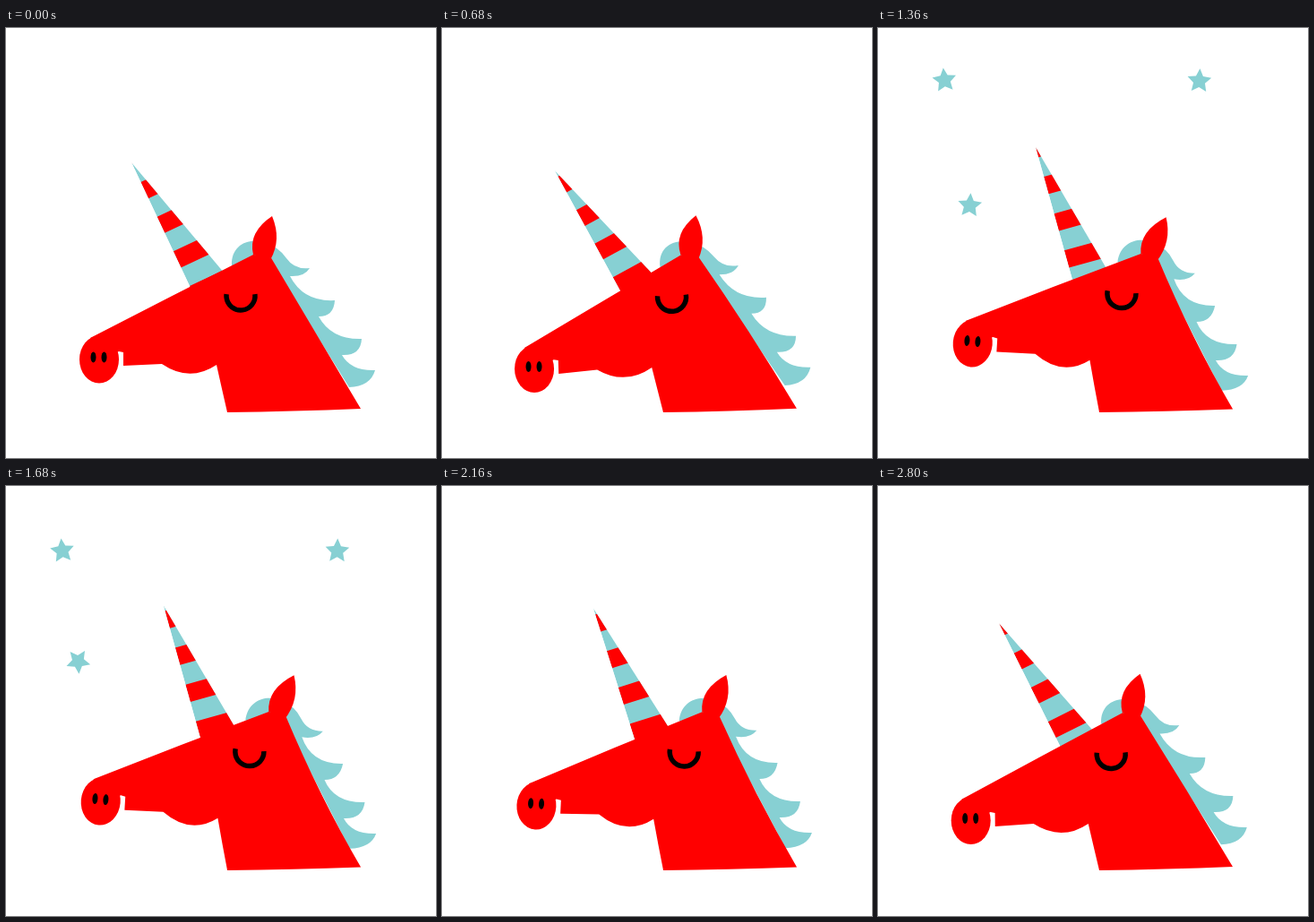
These frames come from a looping animation (480x480 px, 2840 ms). An HTML page with a canvas:

```html
<!DOCTYPE html>
<html lang="en">
<head>
<meta charset="utf-8">
<title>Unicorn</title>
<style>
  html, body { margin: 0; width: 100%; height: 100%; overflow: hidden; background: #fff; }
  canvas { display: block; width: 100vw; height: 100vh; }
</style>
</head>
<body>
<canvas id="stage" width="480" height="480"></canvas>
<script>
const ctx = document.getElementById('stage').getContext('2d');
const RED = '#f00', AQUA = '#87d0d3';
const LOOP = 2840, STEP = 40;

// Keyframes as [time, value], eased between neighbours
const NOD = [[0, 0], [560, -.55], [690, -.55], [1010, 1], [1600, 1], [2095, .92], [2510, -.5], [3000, 0]];
const SNOUT = [[0, 0], [700, 0], [850, 6], [1020, -7], [1060, -7], [1300, 1], [1680, 1],
  [2160, 2.7], [2330, -4], [2480, 0], [3000, 0]];

const MANE = 'M252 265 C251 240 275 233 290 241 Q303 243 313 257 Q322 270 339 268 Q333 278 317 277 ' +
  'Q332 306 367 304 Q366 322 349 322 Q363 348 397 347 Q396 366 375 365 Q385 383 412 382 ' +
  'Q407 400 383 401 L300 268 Z';
const HEAD = 'M94 346 Q185 299 276 253 L295 255 Q346 341 396 425 Q320 428 247 429 Q241 403 235 376 ' +
  'Q205 396 174 375 L131 377 L131 362 L126 361 L104 370 Z';
const EAR = 'M297 210 Q270 228 276 253 L295 259 Q308 236 297 210 Z';

const clamp = (v, lo, hi) => Math.min(hi, Math.max(lo, v));

function track(keys, t) {
  const i = keys.findIndex(k => k[0] > t);
  const [t0, v0] = keys[i - 1], [t1, v1] = keys[i];
  const u = (t - t0) / (t1 - t0);
  return v0 + (v1 - v0) * u * u * (3 - 2 * u);
}

// Bends the head sideways above the fixed neck, and tilts it up or down
function bend(nod, snout) {
  return (x, y) => {
    const z = 354 - y;
    const side = .174 * ((z + Math.hypot(z, 45)) / 2 - 6);
    const lift = Math.min(6, .105 * (x - 285)) * clamp((429 - y) / 44, 0, 1);
    return [x + nod * side, y + nod * lift + snout * Math.max(0, (225 - x) / 121)];
  };
}

function fillPath(path, color, warp) {
  const bent = path.replace(/(\d+) (\d+)/g, (_, x, y) => warp(+x, +y).join(' '));
  ctx.fillStyle = color;
  ctx.fill(new Path2D(bent));
}

function at([x, y], angle, draw) {
  ctx.save();
  ctx.translate(x, y);
  ctx.rotate(angle);
  draw();
  ctx.restore();
}

function ellipse(x, y, rx, ry, color) {
  ctx.fillStyle = color;
  ctx.beginPath();
  ctx.ellipse(x, y, rx, ry, 0, 0, 7);
  ctx.fill();
}

function star(pos, angle, size) {
  at(pos, angle, () => {
    ctx.beginPath();
    for (let i = 0; i < 10; i++) {
      const r = size * (i % 2 ? 6.8 : 14), a = i * Math.PI / 5;
      ctx.lineTo(r * Math.sin(a), -r * Math.cos(a));
    }
    ctx.fillStyle = AQUA;
    ctx.fill();
  });
}

function drawStars(t) {
  const size = clamp((2050 - t) / 250, 0, 1);
  const s = t - 878, late = t - 1030;
  if (s > 0 && size) {
    const out = 158 * (1 - Math.exp(-s / 200));
    const y = 285 - 237 * (1 - Math.exp(-s / 126)) + 24 * (s / 802) ** 3;
    star([218 - out, y], -.1, size);
    star([217 + out * .985, y + 4 * Math.exp(-(s - 162) / 200)], .15 * Math.exp(-s / 500), size);
  }
  if (late > 0 && size) {
    const p = 1 - Math.exp(-late / 200);
    star([218 - 143 * p, 277 - 100 * p + 15 * (late / 650) ** 3], 3.2 * p, size);
  }
  if (t >= 1000 && t <= 1080) {
    const k = (t - 1040) / 40 * 8;
    ctx.strokeStyle = '#ccc';
    ctx.lineWidth = 1;
    ctx.beginPath();
    ctx.moveTo(136 - k * .5, 172 - k);
    ctx.lineTo(130 - k * .5, 162 - k);
    ctx.moveTo(306 + k * .5, 178 - k);
    ctx.lineTo(311 + k * .5, 167 - k);
    ctx.stroke();
  }
}

function drawHorn(t, nod, warp) {
  const degrees = 25.2 - 7.43 * nod - 2.27 * nod * nod;
  const period = 42.7, height = 152;
  at(warp(205, 288), -degrees * Math.PI / 180, () => {
    ctx.beginPath();
    ctx.moveTo(0, -height);
    ctx.lineTo(0, 20);
    ctx.lineTo(45.5, 20);
    ctx.clip();
    ctx.fillStyle = AQUA;
    ctx.fillRect(0, -height, 50, 180);
    ctx.fillStyle = RED;
    const shift = (((.56 - t / 492) % 1) + 1) % 1;
    for (let i = -1; i < 5; i++) ctx.fillRect(0, (shift + i) * period - height, 50, 20);
  });
}

function draw(t) {
  const nod = track(NOD, t), snout = track(SNOUT, t);
  const warp = bend(nod, snout);
  ctx.fillStyle = '#fff';
  ctx.fillRect(0, 0, 480, 480);

  drawStars(t);
  fillPath(MANE, AQUA, warp);
  drawHorn(t, nod, warp);
  fillPath(HEAD, RED, warp);
  fillPath(EAR, RED, warp);

  at(warp(104, 370), Math.max(0, nod * .1 - snout * .01), () => {
    ellipse(0, 0, 22, 26.5, RED);
    ellipse(-6.5, -2.5, 3, 6, '#000');
    ellipse(5.5, -2.5, 3, 6, '#000');
  });

  at(warp(262, 299), nod * .09, () => {
    ctx.strokeStyle = '#000';
    ctx.lineWidth = 5.5;
    ctx.beginPath();
    ctx.arc(0, 0, 16, -.12, Math.PI + .12);
    ctx.stroke();
  });
}

function frame() {
  draw(Math.floor(performance.now() % LOOP / STEP) * STEP);
  requestAnimationFrame(frame);
}
frame();
</script>
</body>
</html>
```
